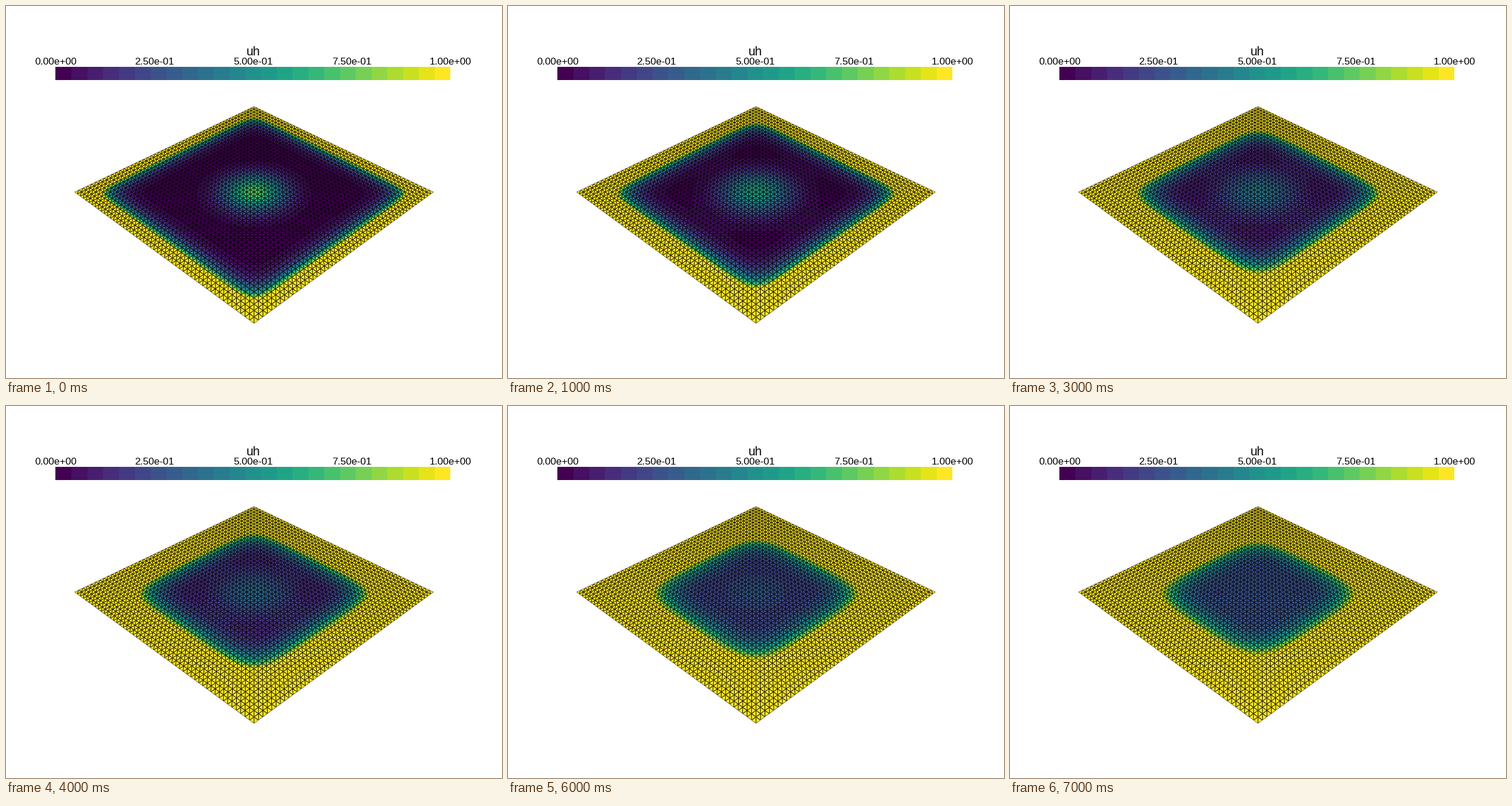
A matplotlib script for the animation above (8 s loop, 864 px wide and 648 px high).

```python
import matplotlib as mpl
import matplotlib.pyplot as plt
import numpy as np
from matplotlib.animation import FuncAnimation
from matplotlib.patches import Rectangle

W, H = 864, 648
CELLS, STEPS, DT = 50, 8, 0.02
EDGE_VALUE = 5.0
SIDE = 4.0
CMAP = mpl.colormaps["viridis"].resampled(25)
LUT = CMAP(np.arange(25))[:, :3]


def solve_heat():
    """Backward Euler with linear triangles on a square, hot fixed boundary."""
    n = CELLS + 1
    h = SIDE / CELLS
    one, up = np.eye(n), np.eye(n, k=1)
    near = np.kron(one, up + up.T) + np.kron(up + up.T, one)
    diag = np.kron(up, up) + np.kron(up.T, up.T)
    full = np.eye(n * n)
    mass = h * h / 12 * (6 * full + near + diag)
    system = mass + DT * (4 * full - near)

    axis = np.linspace(-SIDE / 2, SIDE / 2, n)
    x, y = np.meshgrid(axis, axis, indexing="ij")
    u = np.exp(-5 * (x**2 + y**2)).ravel()
    inner = np.zeros((n, n), bool)
    inner[1:-1, 1:-1] = True
    inner = inner.ravel()

    rows = system[inner]
    inverse = np.linalg.inv(rows[:, inner])
    lift = rows[:, ~inner].sum(axis=1) * EDGE_VALUE
    mass = mass[inner]
    states = []
    for _ in range(STEPS):
        solved = inverse @ (mass @ u - lift)
        u = np.full(n * n, EDGE_VALUE)
        u[inner] = solved
        states.append(u.reshape(n, n))
    return states


def grid_coords():
    """Mesh coordinates under every pixel, seen by an isometric camera."""
    sin15, tan15 = np.sin(np.pi / 12), np.tan(np.pi / 12)
    scale = sin15 / tan15 * H / 2
    k = sin15 * np.sqrt(2 / 3)
    px, py = np.meshgrid(np.arange(W) + 0.5, np.arange(H) + 0.5)
    sx = (px - W / 2) / scale
    sy = (py - H / 2) / (scale / np.sqrt(3))
    depth = 1 + k * sy
    u, v = sx / depth, sy / depth
    half = CELLS / 2
    return half * (1 + v + u), half * (1 + v - u)


def pixel_slope(q):
    gy, gx = np.gradient(q)
    return np.hypot(gx, gy)


A, B = grid_coords()
SLOPE_A, SLOPE_B = pixel_slope(A), pixel_slope(B)

# edge darkness falls off linearly over one pixel
gap = np.min([np.abs(q - np.round(q)) / s for q, s in
              ((A, SLOPE_A), (B, SLOPE_B), (A - B, pixel_slope(A - B)))], axis=0)
LINE = np.clip(1 - gap, 0, 1)[..., None]

border = np.min([A / SLOPE_A, (CELLS - A) / SLOPE_A,
                 B / SLOPE_B, (CELLS - B) / SLOPE_B], axis=0)
COVER = np.clip(0.5 + border, 0, 1)[..., None]

ca, cb = np.clip(A, 0, CELLS), np.clip(B, 0, CELLS)
IA = np.minimum(ca.astype(int), CELLS - 1)
IB = np.minimum(cb.astype(int), CELLS - 1)
FA, FB = ca - IA, cb - IB


def render(u):
    u00, u11 = u[IA, IB], u[IA + 1, IB + 1]
    u10, u01 = u[IA + 1, IB], u[IA, IB + 1]
    value = np.where(FA >= FB,
                     u00 + FA * (u10 - u00) + FB * (u11 - u10),
                     u00 + FB * (u01 - u00) + FA * (u11 - u01))
    level = np.clip(np.floor(value * 25), 0, 24).astype(int)
    return LUT[level] * (1 - LINE) * COVER + 1 - COVER


PICTURES = [render(u) for u in solve_heat()]

# 72 dpi makes one point one pixel
fig = plt.figure(figsize=(W / 72, H / 72), dpi=72, facecolor="white")
ax = fig.add_axes([0, 0, 1, 1])
ax.axis("off")
picture = ax.imshow(PICTURES[0], extent=(0, W, H, 0), interpolation="nearest",
                    aspect="auto")
ax.set_xlim(0, W)
ax.set_ylim(H, 0)

edges = [86] + [int(87.4 + 27.5 * i) for i in range(1, 26)]
for left, right, color in zip(edges, edges[1:], LUT):
    ax.add_patch(Rectangle((left, 106), right - left, 23, facecolor=color,
                           linewidth=0, antialiased=False))


def label(x, y, text, size):
    ax.text(x, y, text, size=size, family="Liberation Sans", color="black",
            ha="center", va="baseline")


label(431, 86.5, "uh", 21.7)
for i in range(5):
    label(86.4 + 172 * i, 101.5, f"{i / 4:.2e}", 17.4)


def update(i):
    picture.set_data(PICTURES[i])
    return [picture]


anim = FuncAnimation(fig, update, frames=STEPS, interval=1000, repeat=True,
                     repeat_delay=0)
plt.show()
```
